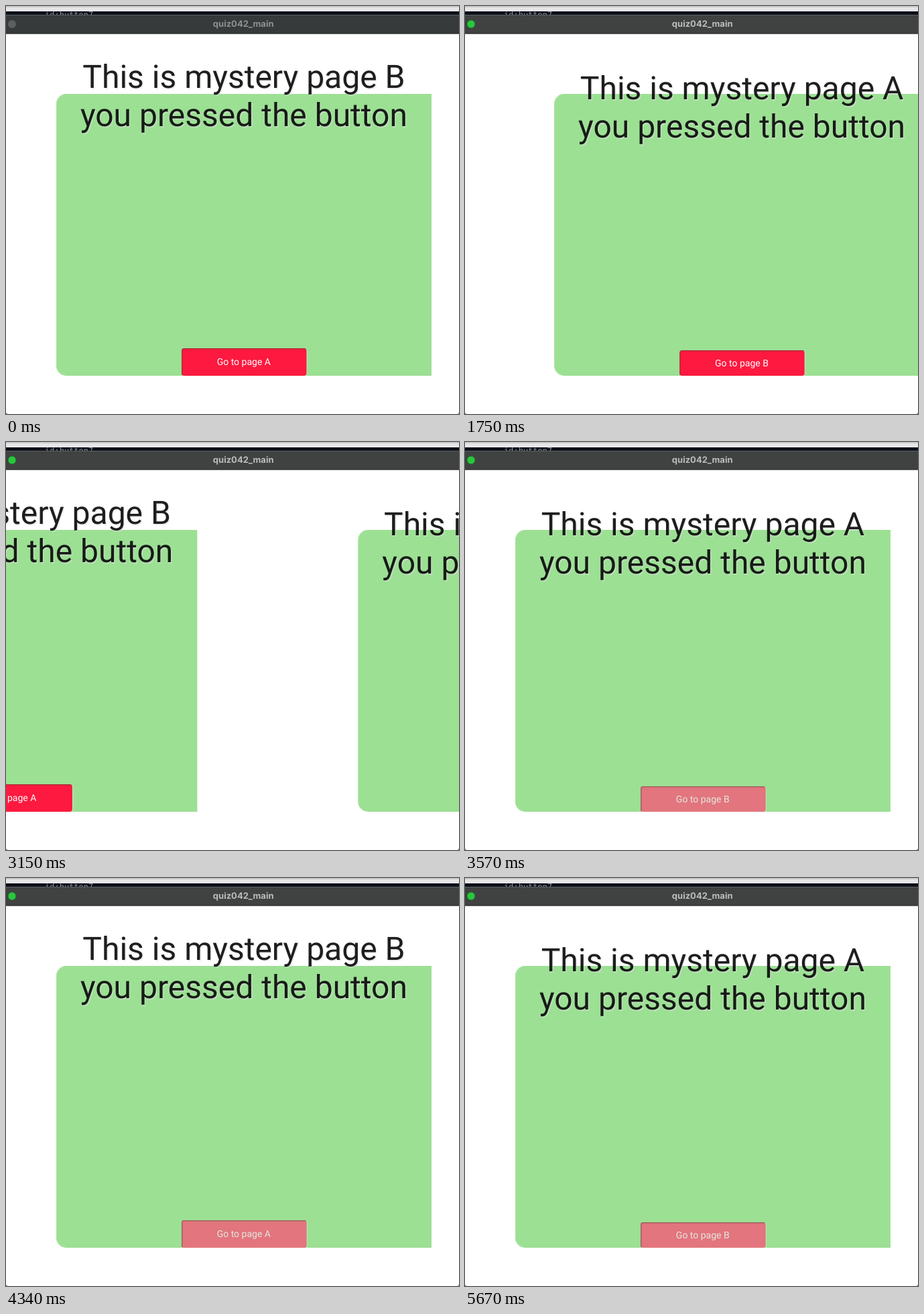
An HTML page that plays this animation: 676 by 608 pixels, repeating every 6.09 s.

```html
<!DOCTYPE html>
<html lang="en">
<head>
<meta charset="utf-8">
<title>quiz042_main</title>
<style>
  html, body { margin: 0; height: 100%; overflow: hidden; background: #fff; }
  svg { display: block; }
  text { text-anchor: middle; font-family: Roboto, sans-serif; text-rendering: geometricPrecision; }
  .head { font-size: 48px; fill: rgba(0, 0, 0, .88); text-shadow: 1.5px 1.5px 1px rgba(222, 222, 222, .6); }
  .label { font-size: 14px; fill: #fff; }
  .title { font: bold 13px Inter, sans-serif; }
  .code { font: 12px "DejaVu Sans Mono", monospace; fill: #8f9298; text-anchor: start; }
</style>
</head>
<body>
<svg id="stage" width="676" height="608" viewBox="0 0 676 608"></svg>
<script>
const LOOP = 6090, STEP = 70, WIDTH = 800, FOCUS = 770;

// Each slide: start time, page that leaves, page that enters, progress at its first step
const slides = [
  { at: 1400, from: 'B', to: 'A', p: -0.103 },
  { at: 2310, from: 'A', to: 'B', p: -0.056 },
  { at: 3080, from: 'B', to: 'A', p: 0.083 },
  { at: 3920, from: 'A', to: 'B', p: 0.05 },
  { at: 5180, from: 'B', to: 'A', p: -0.1 }
];

const page = (name, other, base, top) => `
  <g id="page${name}">
    <path d="M635 131H90a15 15 0 0 0-15 15V536a15 15 0 0 0 15 15H635z" fill="#9ce094"/>
    <path d="M90 131.7a14.3 14.3 0 0 0-14.3 14.3V536a14.3 14.3 0 0 0 14.3 14.3" fill="none" stroke="#a6e39f" stroke-width="1.4"/>
    <text class="head" x="354.9" y="${base}">This is mystery page ${name}</text>
    <text class="head" x="354.9" y="${base + 57}">you pressed the button</text>
    <rect x="264" y="${top + 1}" width="186" height="${550 - top}" rx="4" fill="#b9e6b2"/>
    <rect x="262" y="${top}" width="186.5" height="${551 - top}" rx="4" fill="#fd193f"/>
    <text class="label" x="354.8" y="${(top + 551) / 2 + 4.8}">Go to page ${other}</text>
    <rect id="ripple${name}" x="262" y="${top}" width="186.5" height="${551 - top}" rx="4" fill="#c8d2be" opacity=".5"/>
    <path d="M262.7 550V${top + 4}a3.3 3.3 0 0 1 3.3-3.3H447" fill="none" stroke="#3c4a30" stroke-opacity=".42" stroke-width="1.5"/>
  </g>`;

document.getElementById('stage').innerHTML = `
  <rect width="676" height="608" fill="#3a3c3e"/>
  <rect y="30" width="676" height="578" rx="3" fill="#fff"/>
  ${page('A', 'B', 139.4, 513)}
  ${page('B', 'A', 122.4, 510)}
  <rect width="676" height="9" fill="#e6e6e8"/>
  <rect width="676" height="2" fill="#c8c8cb"/>
  <rect y="8" width="676" height="6" fill="#0a0e18"/>
  <text class="code" x="58" y="17">id:button7</text>
  <rect id="bar" y="13" width="676" height="28.5"/>
  <rect y="13" width="676" height="1" fill="#5e6163"/>
  <rect y="40.5" width="676" height="1" fill="#2a2c2c"/>
  <circle id="dot" cx="9" cy="27" r="6"/>
  <text id="title" class="title" x="354.2" y="31">quiz042_main</text>`;

const el = id => document.getElementById(id);
const set = (id, attrs) => { for (const k in attrs) el(id).setAttribute(k, attrs[k]); };
const place = (name, x) => set('page' + name, {
  transform: `translate(${x} 0)`,
  display: Math.abs(x) < WIDTH ? 'inline' : 'none'
});

function draw(t) {
  const active = t >= FOCUS;
  set('bar', { fill: active ? '#404241' : '#373a3b' });
  set('dot', { fill: active ? '#2ac63f' : '#5c5e5f', stroke: active ? '#1f6b2a' : 'none' });
  set('title', { fill: active ? '#bcbdbd' : '#8f9192' });

  const past = slides.filter(s => t >= s.at);
  const now = past.at(-1);
  let eased = 0;
  if (now) {
    const n = Math.floor((t - now.at) / STEP);
    const p = Math.min(1, Math.max(0, now.p + n / 6));
    eased = 1 - (1 - p) ** 2;
  }
  const { from, to } = now || { from: 'B', to: 'A' };
  place(from, -WIDTH * eased);
  place(to, WIDTH * (1 - eased));

  // A pressed button stays tinted when its page comes back
  const worn = past.some(s => s.from === to);
  set('ripple' + from, { display: 'none' });
  set('ripple' + to, { display: worn ? 'inline' : 'none' });
}

const start = performance.now();
function tick() {
  draw((performance.now() - start) % LOOP);
  requestAnimationFrame(tick);
}
draw(0);
requestAnimationFrame(tick);
</script>
</body>
</html>
```
